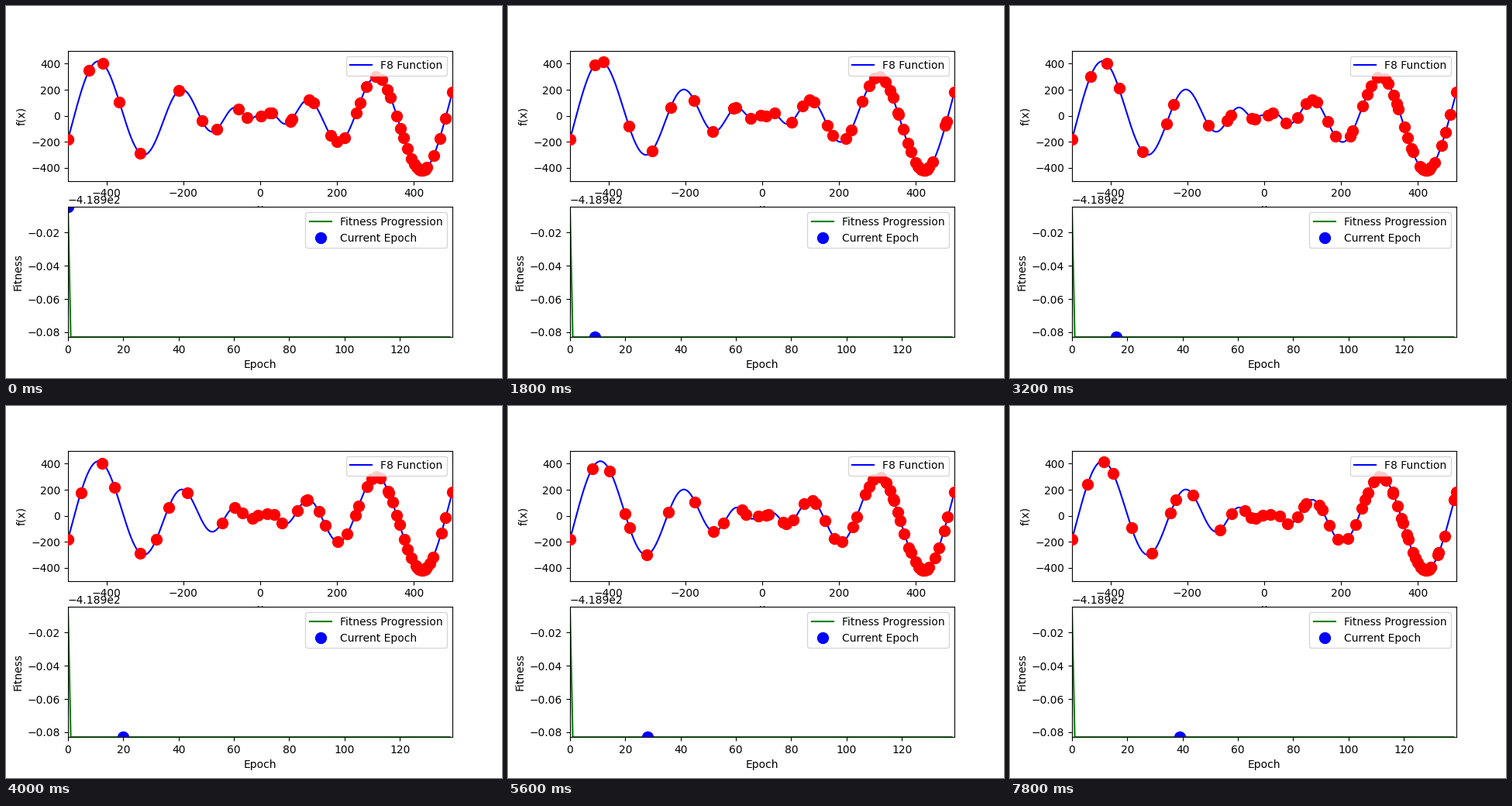
A matplotlib script for the animation above (8000 ms loop, 640 px wide and 480 px high).

```python
import matplotlib.pyplot as plt
import numpy as np
from matplotlib.animation import FuncAnimation

EPOCHS = 40
STEP_MS = 200
BEST, FIRST = -418.98289, -418.9046
LIMIT = 500

# The swarm's spread: share of members found left of each position.
SPREAD_X = [-480, -300, -60, 100, 250, 330, 400, 440, 495]
SPREAD_SHARE = [0, 0.09, 0.21, 0.38, 0.54, 0.68, 0.87, 0.92, 1]


def f8(x):
    return -x * np.sin(np.sqrt(np.abs(x)))


def swarm(epoch):
    """Scattered members, a group in the deepest valley, some at the limits."""
    rng = np.random.default_rng(epoch)
    count = 36 + epoch // 3
    share = (np.arange(count) + rng.random(count)) / count
    scattered = np.interp(share, SPREAD_SHARE, SPREAD_X)
    valley = np.linspace(408, 434, 6)
    return np.concatenate([[-LIMIT, LIMIT], valley, scattered])


fig, (top, bottom) = plt.subplots(2, 1, figsize=(6.4, 4.8), dpi=100)

x = np.linspace(-LIMIT, LIMIT, 1000)
top.plot(x, f8(x), "b-", label="F8 Function")
dots = top.scatter([], [], s=100, color="red", zorder=3)
top.set(xlim=(-LIMIT, LIMIT), ylim=(-LIMIT, LIMIT), xlabel="x", ylabel="f(x)")
top.legend(loc="upper right")

fitness = np.full(139, BEST)
fitness[0] = FIRST
bottom.plot(fitness, "g-", label="Fitness Progression")
marker, = bottom.plot([], [], "bo", markersize=10, label="Current Epoch")
bottom.set(xlim=(0, 139), ylim=(BEST, FIRST), xlabel="Epoch", ylabel="Fitness")
bottom.legend(loc="upper right")


def update(epoch):
    xs = swarm(epoch)
    dots.set_offsets(np.column_stack([xs, f8(xs)]))
    marker.set_data([epoch], [fitness[epoch]])
    return dots, marker


anim = FuncAnimation(fig, update, frames=EPOCHS, interval=STEP_MS,
                     repeat=True, repeat_delay=0)
plt.show()
```
